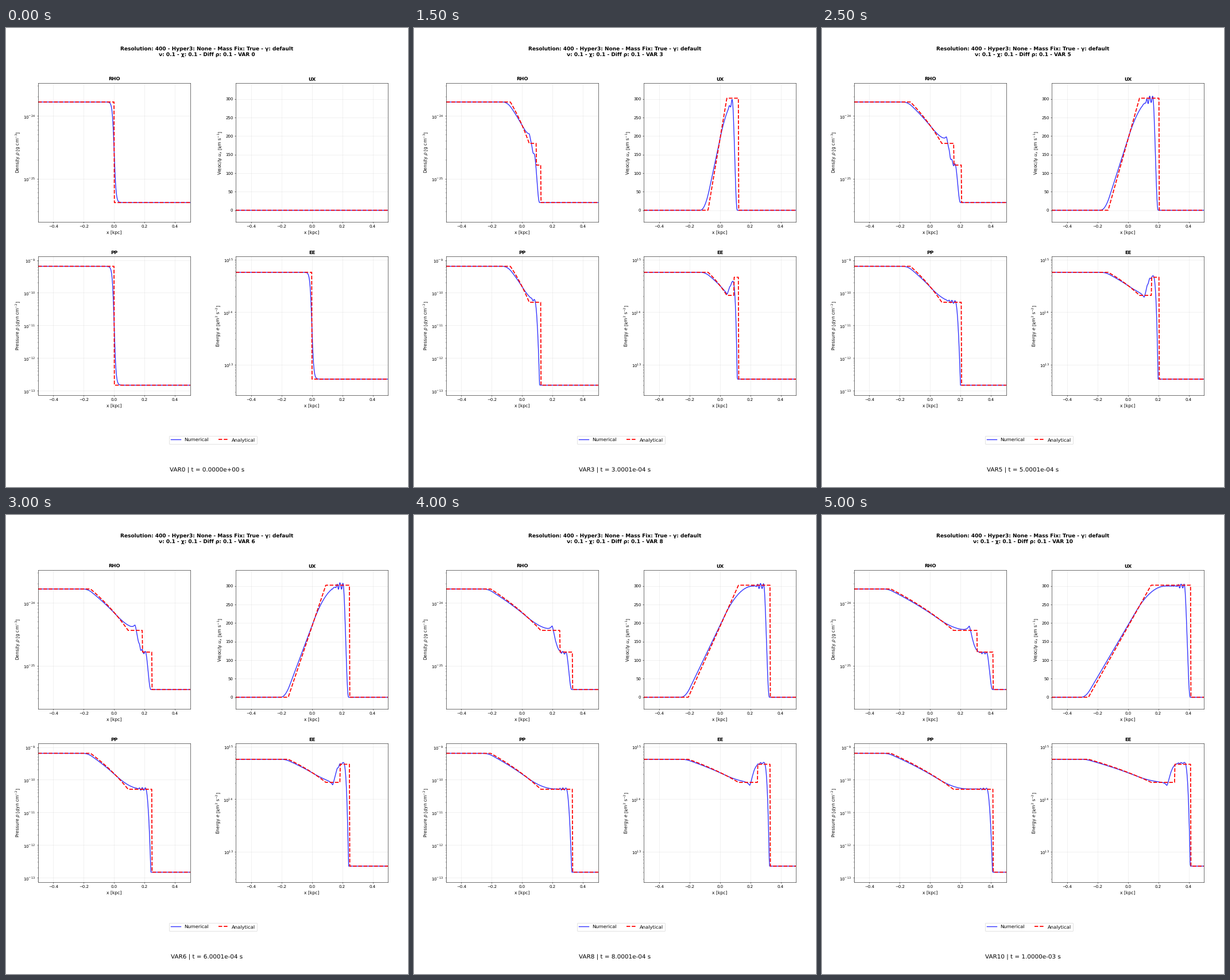
A matplotlib script that plays this animation: 700x800 px, repeating every 5.5 s.

```python
import numpy as np
import matplotlib.pyplot as plt
from matplotlib.animation import FuncAnimation

plt.rcParams["text.hinting"] = "none"

FRAMES, INTERVAL = 11, 500
GAMMA = 5 / 3
KPC = 1.0227e-3            # kpc travelled at 1 km/s in one unit of t
CGS = 1e10                 # (km/s)^2 in (cm/s)^2

RHO_L, E_L = 1.6726e-24, 5.78e14
RHO_R, E_R = RHO_L / 40, 5.33e12
P_L, P_R = (r * e * (GAMMA - 1) for r, e in ((RHO_L, E_L), (RHO_R, E_R)))
C_L = np.sqrt(GAMMA * P_L / RHO_L / CGS)

x = np.linspace(-0.5, 0.5, 400)


def energy(rho, p):
    return p / (rho * (GAMMA - 1))


def fan(u):
    """Density and pressure on the left isentrope at velocity u."""
    c = 1 - u / (3 * C_L)
    return RHO_L * c**3, P_L * c**5


def star_state():
    """Pressure and velocity between the rarefaction and the shock."""
    lo, hi = P_R, P_L
    for _ in range(80):
        p = (lo + hi) / 2
        left = 3 * C_L * (1 - (p / P_L) ** 0.2)
        right = (p - P_R) * np.sqrt(0.75 / RHO_R / (p + P_R / 4) / CGS)
        lo, hi = (p, hi) if left > right else (lo, p)
    return p, left


P_S, U_S = star_state()
RHO_HOT = RHO_R * (P_S / P_R + 0.25) / (P_S / P_R / 4 + 1)
SHOCK = U_S / (1 - RHO_R / RHO_HOT)


def analytical(t):
    if t == 0:
        left = x < 0
        return (np.where(left, RHO_L, RHO_R), 0 * x, np.where(left, P_L, P_R))
    v = x / (KPC * t)
    u = np.clip(0.75 * (C_L + v), 0, U_S)
    rho, p = fan(u)
    rho = np.where(v > U_S, RHO_HOT, rho)
    ahead = v > SHOCK
    return (np.where(ahead, RHO_R, rho), np.where(ahead, 0, u),
            np.where(ahead, P_R, p))


def ramp(x0, w):
    """Unit-slope ramp starting at x0, its corner rounded over +-w."""
    d = x - x0
    return np.where(d > w, d, np.clip(d + w, 0, None) ** 2 / (4 * w))


def blend(a, b, s):
    return np.exp(np.log(a) + (np.log(b) - np.log(a)) * s)


def numerical(t):
    if t == 0:
        s = 0.5 * (1 + np.tanh(x / 0.0125))
        return blend(RHO_L, RHO_R, s), 0 * x, blend(P_L, P_R, s)

    # rarefaction and plateau
    u0, head = 190 + 4 * t, -0.0215 - 0.256 * t
    slope = -u0 / head
    u = slope * (ramp(head, 0.03)
                 - ramp((300 - u0) / slope, 0.103 * np.tanh(2 * t)))

    # ringing that travels with the shock
    foot, width = 0.4225 * t - 0.0125, 0.032 + 0.008 * t
    back = np.clip(foot - width - x, 0, None)
    amp = 75 * t * np.exp(-2.5 * t)
    ring = (amp * np.cos(2 * np.pi * back / 0.0195)
            * np.exp(-((back - 0.018) / 0.025) ** 2)
            + 1.4 * np.cos(2 * np.pi * back / 0.0125) * np.exp(-back / 0.12))
    ring *= np.clip((u - 270) / 20, 0, 1)
    rho, p = fan(u - ring)
    u = u + ring

    # contact with its density bump
    d = x - (0.3 * t - 0.044)
    grow = min(1, 2.5 * t)
    mix = 1 - np.exp(-(np.clip(d, 0, None) / (0.02 + 0.0095 * t)) ** 1.5)
    bump = 0.064 * np.exp(np.clip(d, None, 0) / 0.014)
    rho = rho * 10 ** (grow * (bump * (1 - mix) - 0.366 * mix))

    # smeared shock
    q = np.clip((foot - x) / width, 0, 1)
    s = np.sin(np.pi / 2 * q) ** 2
    return blend(RHO_R, rho, s), u * s, blend(P_R, p, 1 - (1 - q) ** 2.2)


def fields(state):
    rho, u, p = state
    return rho, u, p, energy(rho, p)


def log_limits(low, high):
    return 0.494 * low, 2 * high


PANELS = [
    ("RHO", r"Density $\rho$ [g cm$^{-3}$]", log_limits(RHO_R, RHO_L)),
    ("UX", r"Velocity $u_x$ [km s$^{-1}$]", (-31.2, 342.9)),
    ("PP", r"Pressure $p$ [dyn cm$^{-2}$]", log_limits(P_R, P_L)),
    ("EE", r"Energy $e$ [km$^2$ s$^{-2}$]", log_limits(E_R, E_L)),
]

fig, axes = plt.subplots(2, 2, figsize=(14, 16), dpi=50)
fig.subplots_adjust(left=0.08, right=0.95, bottom=0.2, top=0.88,
                    wspace=0.3, hspace=0.25)

blue, red = [], []
for ax, (name, label, ylim) in zip(axes.flat, PANELS):
    if name != "UX":
        ax.set_yscale("log")
    blue += ax.plot([], [], "b-", lw=2, alpha=0.8, snap=False,
                    label="Numerical")
    red += ax.plot([], [], "r--", lw=2.5, snap=False, label="Analytical")
    ax.set_xlim(-0.5, 0.5)
    ax.set_ylim(*ylim)
    ax.set_title(name, fontsize=12, fontweight="bold")
    ax.set_xlabel("x [kpc]", fontsize=11)
    ax.set_ylabel(label, fontsize=11)
    ax.grid(True, alpha=0.3)

fig.legend(handles=[blue[0], red[0]], loc="center", ncol=2, fontsize=12,
           bbox_to_anchor=(0.515, 0.1025))
title = fig.suptitle("", y=0.96, fontsize=13, fontweight="bold")
clock = fig.text(0.5, 0.0325, "", ha="center", va="baseline", fontsize=15)


def update(i):
    t = i / 10
    for lines, state in ((blue, numerical(t)), (red, analytical(t))):
        for line, y in zip(lines, fields(state)):
            line.set_data(x, y)
    title.set_text("Resolution: 400 - Hyper3: None - Mass Fix: True - γ: default\n"
                   f"ν: 0.1 - χ: 0.1 - Diff ρ: 0.1 - VAR {i}")
    seconds = i * 1e-4 + 1e-8 * (i > 2)
    clock.set_text(f"VAR{i} | t = {seconds:.4e} s")
    return blue + red + [title, clock]


anim = FuncAnimation(fig, update, frames=FRAMES, interval=INTERVAL,
                     init_func=lambda: update(0), repeat=True, repeat_delay=0)
plt.show()
```
